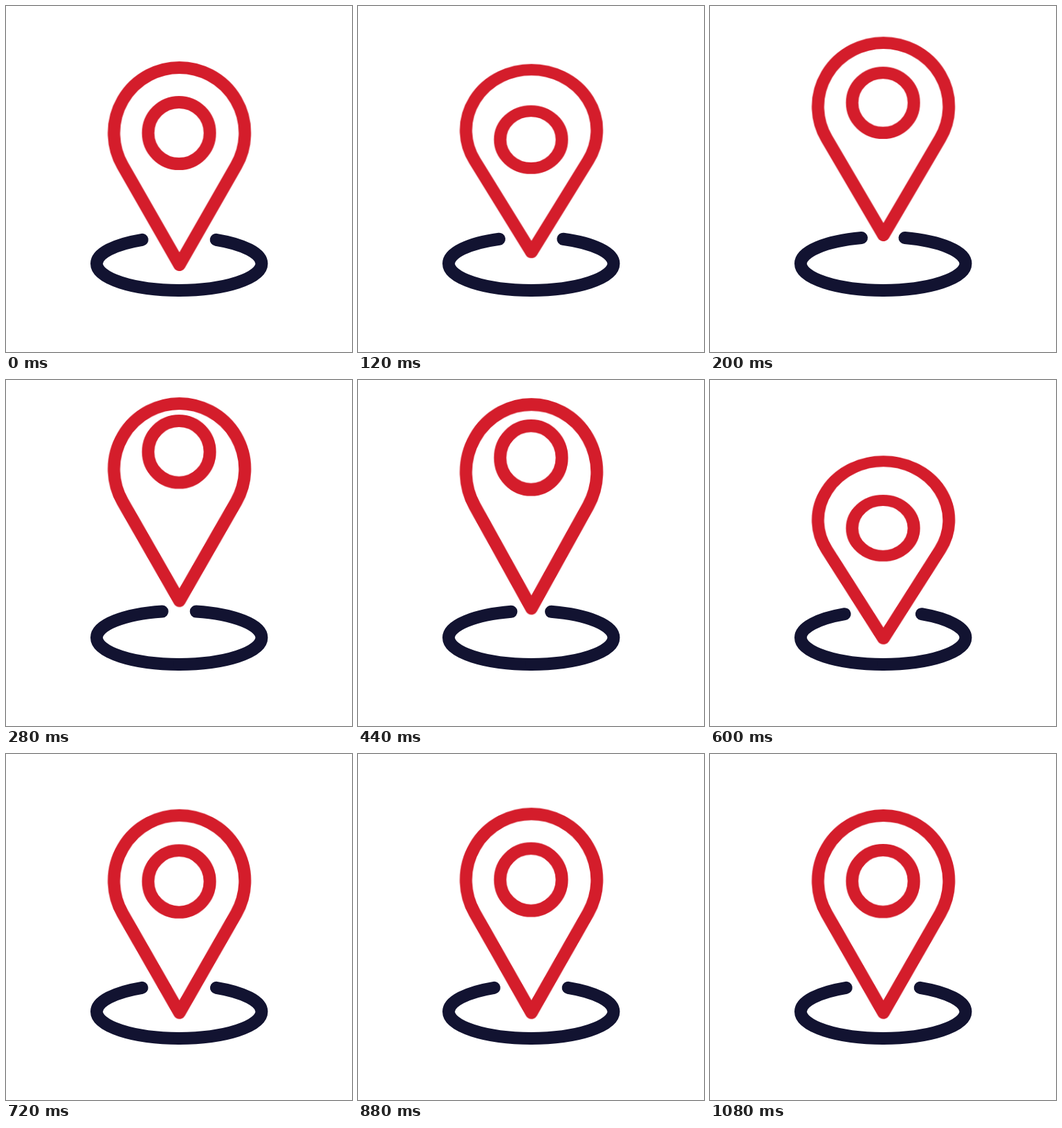
Write an HTML page without scripts that moves like this. It is 500x500 px and loops after 1.12 s.

```html
<!DOCTYPE html>
<html lang="en">
<head>
<meta charset="utf-8">
<title>Map pin</title>
<style>
  html, body { margin: 0; width: 100%; height: 100%; overflow: hidden; background: #fff; }
  svg { display: block; width: 100%; height: 100%; fill: none; stroke-width: 18; stroke-linecap: round; stroke-linejoin: round; }
  .pin { stroke: #d41d2b; }
  .ring { stroke: #121331; }

  .hop, .squash, .dot, .half { animation: 1120ms linear infinite; }
  .hop, .squash, .dot { transform-origin: 0 0; }
  .hop { animation-name: hop; }
  .squash { animation-name: squash; }
  .dot { animation-name: dot; }
  .half { stroke-dasharray: 264; animation-name: gap; }

  /* ballistic jump of the tip */
  @keyframes hop {
    0% { transform: translateY(0); }
    7.14% { transform: translateY(0); animation-timing-function: cubic-bezier(.333, .667, .667, 1); }
    28.13% { transform: translateY(-56px); animation-timing-function: cubic-bezier(.333, 0, .667, .333); }
    52.5%, 100% { transform: translateY(0); }
  }
  @keyframes squash {
    0% { transform: scaleY(1); animation-timing-function: ease-in-out; }
    7.14% { transform: scaleY(.9); }
    10.71% { transform: scaleY(.926); }
    17.86% { transform: scaleY(.975); }
    25% { transform: scaleY(1); }
    28.57% { transform: scaleY(1.004); }
    39.29% { transform: scaleY(1.033); }
    50% { transform: scaleY(1.062); }
    53.57% { transform: scaleY(.9); animation-timing-function: ease-in-out; }
    67.86% { transform: scaleY(1.015); animation-timing-function: ease-in-out; }
    78.57% { transform: scaleY(1.008); animation-timing-function: ease-out; }
    92%, 100% { transform: scaleY(1); }
  }
  /* the inner circle trails behind the pin */
  @keyframes dot {
    0% { transform: translateY(0); animation-timing-function: ease-in-out; }
    7.14% { transform: translateY(11px); }
    10.71% { transform: translateY(14.5px); animation-timing-function: ease-in-out; }
    25% { transform: translateY(-25px); }
    28.57% { transform: translateY(-26px); }
    39.29% { transform: translateY(-20.2px); animation-timing-function: ease-in; }
    53.57% { transform: translateY(12.7px); animation-timing-function: ease-in-out; }
    67.86% { transform: translateY(-1px); }
    78.57% { transform: translateY(-.5px); }
    92%, 100% { transform: translateY(0); }
  }
  /* half of the opening at the back of the ring */
  @keyframes gap {
    0% { stroke-dashoffset: 53.3px; }
    7.14% { stroke-dashoffset: 53.3px; }
    10.71% { stroke-dashoffset: 46.3px; animation-timing-function: ease-out; }
    25% { stroke-dashoffset: 24.3px; }
    28.57% { stroke-dashoffset: 23.8px; animation-timing-function: ease-in; }
    39.29% { stroke-dashoffset: 28.5px; }
    50% { stroke-dashoffset: 48px; }
    53.57% { stroke-dashoffset: 55.4px; animation-timing-function: ease-in-out; }
    67.86%, 100% { stroke-dashoffset: 53.3px; }
  }
</style>
</head>
<body>
<svg viewBox="0 0 500 500">
  <g class="ring" transform="translate(250.2 372.3)">
    <path class="half" d="M0 38.6A119.2 38.6 0 0 1 0 -38.6"/>
    <path class="half" d="M0 38.6A119.2 38.6 0 0 0 0 -38.6"/>
  </g>
  <g class="pin" transform="translate(250.6 374)">
    <g class="hop">
      <g class="squash">
        <path d="M0 0L-82.1 -143.5A94.6 94.6 0 1 1 82.1 -143.5Z"/>
        <circle class="dot" cx="-.6" cy="-190.5" r="44.6"/>
      </g>
    </g>
  </g>
</svg>
</body>
</html>
```
